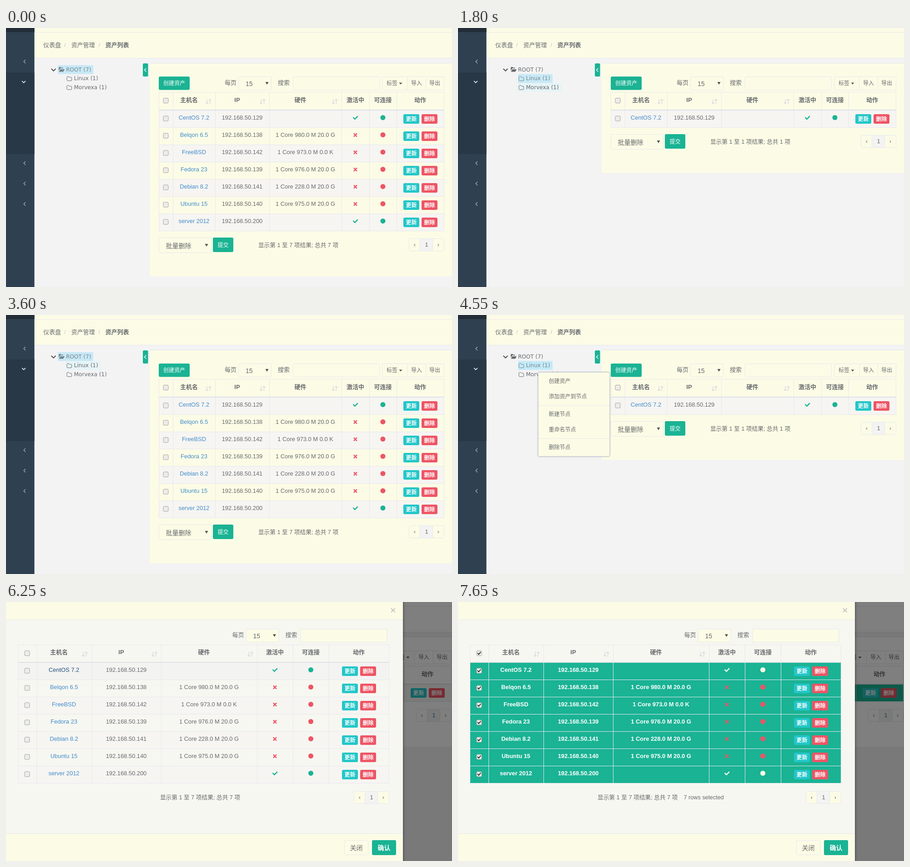
These frames come from a looping animation (981x571 px, 8 s). An HTML page:

```html
<!DOCTYPE html>
<html lang="zh-CN">
<head>
<meta charset="utf-8">
<title>资产列表</title>
<style>
html, body { margin: 0; width: 100%; height: 100%; overflow: hidden; background: #f3f3f4; }
svg { display: block; width: 981px; height: 571px; --cream: #fcfce6; --text: #676a6c; --line: #e6e8ee; --green: #1ab394; }
text { font: 13px "Liberation Sans", Arial, "Noto Sans CJK SC", "Noto Sans CJK", sans-serif; fill: var(--text); white-space: pre; }
.m { text-anchor: middle; }
.b { font-weight: bold; }
.s { font-size: 12px; }
.l { font-size: 14px; }
.lat { font-size: 12.9px; }
.info { font-size: 12.7px; }
.w { fill: #fff; }
.link { fill: #428bca; }
.deep { fill: #23527c; }
.sep { fill: #c4c5c4; }
.tree { font: 12px "DejaVu Sans", Verdana, sans-serif; }
.on text { fill: #fff; font-weight: bold; }
.close { font-size: 21px; font-weight: bold; fill: #c9cac4; }
.ico { fill: none; stroke-linecap: round; stroke-linejoin: round; }
.dim { --cream: #fff; }
.dim .page { fill: #337ab7; }
</style>
</head>
<body>
<svg id="stage" viewBox="0 0 981 571" xmlns="http://www.w3.org/2000/svg"></svg>
<script>
const hosts = [
  ['CentOS 7.2', 129, '', 1],
  ['Belqon 6.5', 138, '1 Core 980.0 M 20.0 G', 0],
  ['FreeBSD', 142, '1 Core 973.0 M 0.0 K', 0],
  ['Fedora 23', 139, '1 Core 976.0 M 20.0 G', 0],
  ['Debian 8.2', 141, '1 Core 228.0 M 20.0 G', 0],
  ['Ubuntu 15', 140, '1 Core 975.0 M 20.0 G', 0],
  ['server 2012', 200, '', 1]
];
const views = [hosts, [hosts[0]], [hosts[6]]];
const nodes = [['ROOT (7)', 114, 78], ['Linux (1)', 132, 76], ['Morvexa (1)', 132, 96]];
const mainCols = [336, 367, 460, 579, 738, 799, 859, 963];
const modalCols = [26, 67, 188, 341, 552, 631, 710, 842];
const green = 'var(--green)', cream = 'var(--cream)', line = 'var(--line)';
const red = '#ed5565', teal = '#23c6c8';

// [time, changes]: sel/hov = tree node, view = table contents, item = menu entry, layer = backdrop/dialog
const LOOP = 8000;
const steps = [
  [0, {sel: 0, hov: -1, view: 0, menu: 0, item: -1, focus: 0, layer: 0, row: -1, link: -1, on: 0, box: -2, press: 0, all: 0}],
  [950, {hov: 0}], [1100, {hov: 1}], [1500, {sel: 1}], [1550, {view: 1}],
  [1800, {hov: 2}], [2300, {sel: 2}], [2350, {view: 2}],
  [2800, {hov: 1}], [2850, {hov: 0}], [3200, {sel: 0}], [3250, {view: 0}],
  [3600, {hov: 1}], [4100, {sel: 1, view: 1}], [4550, {menu: 1}],
  [5000, {hov: -1, item: 0}], [5050, {item: 1}], [5750, {focus: 1}],
  [5900, {menu: 0, layer: 1}], [5950, {layer: 2, row: 1}],
  [6250, {row: 0, link: 0}], [6300, {link: -1}], [6500, {row: -1}],
  [6650, {box: -1}], [6850, {press: 1}], [7000, {on: 1, press: 0}], [7050, {all: 1, box: -2}],
  [7550, {box: 6}], [7650, {box: -2}]
];

const text = (x, y, s, c = '') => `<text x="${x}" y="${y}" class="${c}">${s}</text>`;
const rect = (x, y, w, h, fill, r = 0, extra = '') =>
  `<rect x="${x}" y="${y}" width="${w}" height="${h}" rx="${r}" fill="${fill}" ${extra}/>`;
const frame = (x, y, w, h, r = 1, fill = cream, color = line) =>
  rect(x + .5, y + .5, w - 1, h - 1, fill, r, `stroke="${color}"`);
const hline = (x, y, w, c = line, h = 1) => rect(x, y, w, h, c);
const path = (d, color, w) => `<path class="ico" d="${d}" stroke="${color}" stroke-width="${w}"/>`;
const shape = (d, c) => `<path d="${d}" fill="${c}"/>`;
const left = (x, y, c, w = 1.3) => path(`M${x + 2} ${y - 3.5}l-3.5 3.5 3.5 3.5`, c, w);
const down = (x, y, c, w = 1.6, r = 3.5) => path(`M${x - r} ${y - r / 2}l${r} ${r} ${r} ${-r}`, c, w);
const caret = (x, y, r = 3.5, h = 6) => shape(`M${x - r} ${y - h / 2}h${2 * r}l${-r} ${h}z`, '#555');
const button = (x, y, w, h, s, fill, c = 's', dy = 4.5) =>
  rect(x, y, w, h, fill, 3) + text(x + w / 2, y + h / 2 + dy, s, 'm w ' + c);

function checkbox(x, y, on, hover, press) {
  return rect(x - 5.5, y - 5.5, 11, 11, press ? '#d4d4d4' : '#ececea', 2, `stroke="${hover ? '#666' : '#a3a3a3'}"`) +
    (on ? path(`M${x - 3} ${y}l2.2 2.5 4 -5`, '#333', 2) : '');
}

function sorter(x, y) {
  return path(`M${x - 3} ${y - 5}v10m-2.5 -2.5l2.5 2.5 2.5 -2.5M${x + 3.5} ${y + 5}v-10m-2.5 2.5l2.5 -2.5 2.5 2.5`, '#d9dbe1', 1.5);
}

function table(cols, top, rows, o) {
  const mid = i => (cols[i] + cols[i + 1]) / 2;
  const x0 = cols[0], w = cols[7] - x0;
  let s = '';
  ['主机名', 'IP', '硬件', '激活中', '可连接', '动作'].forEach((h, i) => {
    s += text(mid(i + 1) - (i < 3 ? 11 : 0), top + 22 - o.lift, h, 'm b');
    if (i < 3) s += sorter(cols[i + 2] - 15, top + 21);
  });
  s += checkbox(mid(0), top + 19, o.on, o.box === -1, o.press);
  rows.forEach(([name, ip, hw, up], i) => {
    const y = top + 40 + i * 38 - o.lift, c = y + 16.5;
    const fill = o.on ? green : o.row === i ? '#f3f3f2' : i % 2 ? 'none' : '#f6f5f2';
    const ok = o.on ? '#fcfce6' : green;
    s += `<g class="${o.on ? 'on' : ''}">` + rect(x0, y, w, 38, fill) +
      text(mid(1), y + 21, name, 'm lat ' + (o.link === i ? 'deep' : 'link')) +
      text(mid(2), y + 21, '192.168.50.' + ip, 'm lat') + text(mid(3), y + 21, hw, 'm lat') + '</g>';
    s += checkbox(mid(0), y + 18.5, o.on, o.box === i);
    s += up ? path(`M${mid(4) - 4.3} ${c + .2}l3.2 3.2 5.8 -6`, ok, 2.4)
      : path(`M${mid(4) - 2.8} ${c - 2.3}l5.6 5.6m0 -5.6l-5.6 5.6`, red, 2.5);
    s += `<circle cx="${mid(5)}" cy="${c}" r="5.5" fill="${up ? ok : red}"/>`;
    s += button(mid(6) - 37, y + 9, 35, 21, '更新', teal, 's b') + button(mid(6) + 3, y + 9, 35, 21, '删除', red, 's b');
  });
  const base = top + 40 + rows.length * 38 - o.lift;
  s += hline(x0, top, w) + hline(x0, top + 39 - o.lift, w, '#dfe1e8', 2);
  rows.forEach((_, i) => { s += hline(x0, top + 78 - o.lift + i * 38, w); });
  cols.forEach(x => { s += rect(x, top, 1, base - top, line); });
  return s;
}

function filters(x, y) {
  return text(x, y + 18, '每页') + frame(x + 30, y, 73, 30) + text(x + 46, y + 21, '15', 'l') + caret(x + 93, y + 15) +
    text(x + 117, y + 18, '搜索') + frame(x + 150, y, 191, 30);
}

function pager(x, y) {
  return frame(x, y, 78, 28, 3) + rect(x + 25, y + 1, 28, 26, '#f3f3f2') +
    rect(x + 24, y, 1, 28, line) + rect(x + 52, y, 1, 28, line) +
    text(x + 13, y + 18, '‹', 'm') + text(x + 39, y + 18, '1', 'm page') + text(x + 65, y + 18, '›', 'm');
}

const summary = n => `显示第 1 至 ${n} 项结果; 总共 ${n} 项`;

function sidebar() {
  let s = rect(0, 0, 62.5, 571, '#2f4050') + rect(0, 0, 62.5, 9, '#232d37') + rect(0, 98, 62.5, 180, '#293846');
  for (const y of [74, 298, 343, 388]) s += left(40.5, y, '#a7b1c2');
  return s + down(39, 119, '#fff');
}

function tree(st) {
  let s = down(104.5, 92.5, '#444', 2, 4.3);
  nodes.forEach(([name, x, w], i) => {
    const y = 82 + i * 19.5, sel = st.sel === i, hov = st.hov === i;
    const ink = sel ? '#75868d' : '#676a6c';
    if (sel) s += rect(x, y, w, 19.5, hov ? '#c3eaf8' : '#c8e9f6');
    else if (hov) s += rect(x, y, w, 19.5, '#e6f4f7');
    s += i ? path(`M134 ${y + 7}q0 -1.5 1.5 -1.5h2.5l1.5 1.8h3.5q1.5 0 1.5 1.5v4.7q0 1.3 -1.5 1.3h-7.5q-1.5 0 -1.5 -1.3z`, ink, 1)
      : shape('M116 94v-6.500q0-1.500 1.500-1.500h2.500l1.300 1.500h3.700q1 0 1 1.500h-6.500zM116.500 96.500l3-5.500h9.500l-3 5.500z', ink);
    s += text(i ? 149.5 : 132, y + 13.7, name, 'tree').replace('<text', `<text style="fill:${ink}"`);
  });
  return s;
}

function page(st) {
  const rows = views[st.view], dy = (rows.length - 7) * 38;
  return rect(0, 0, 981, 571, '#f3f3f4') + rect(62, 0, 919, 66, cream) + hline(62, 9, 919) + hline(62, 66, 919) +
    sidebar() +
    text(82, 42, '仪表盘') + text(128, 42, '/', 'sep') + text(143.5, 42, '资产管理') +
    text(203.5, 42, '/', 'sep') + text(218.5, 42, '资产列表', 'b') +
    tree(st) +
    rect(316, 77, 665, 470.5 + dy, cream) + hline(316, 77, 665) +
    rect(301, 78, 11.5, 29, green, 2.5) + left(306, 92.500, '#fff', 1.4) +
    `<g transform="translate(${st.layer ? 16 : 0})">` +
    button(336, 107, 68, 29.5, '创建资产', green) + filters(481, 107) +
    frame(827, 107, 56, 30) + frame(882, 107, 42, 30) + frame(923, 107, 41, 30) +
    text(849, 126, '标签', 'm s') + caret(868, 122.5, 3.5, 4) + text(903, 126, '导入', 'm s') + text(943, 126, '导出', 'm s') +
    table(mainCols, 141, rows, {on: st.all, row: -1, link: -1, box: -2, lift: 0}) +
    frame(336, 462 + dy, 116, 34) + text(351.5, 485 + dy, '批量删除', 'l') + caret(441, 479 + dy) +
    button(455, 462 + dy, 45, 32, '提交', green) +
    text(643, 483 + dy, summary(rows.length), 'm info') + pager(886, 464 + dy) + '</g>';
}

function menu(st) {
  const top = [130, 164, 203, 237, 276];
  let s = rect(176.5, 126.5, 157, 185, cream, 3, 'stroke="#cfd2d6" style="filter:drop-shadow(0 0 1.5px rgba(86,96,117,.6))"');
  s += hline(177, 199, 156) + hline(177, 272, 156);
  ['创建资产', '添加资产到节点', '新建节点', '重命名节点', '删除节点'].forEach((name, i) => {
    const hot = st.item === i;
    if (hot) s += st.focus ? rect(177, 165, 156, 30, cream, 1, 'stroke="#7daeea" stroke-width="2"')
      : rect(177, top[i], 156, 31, '#f5f5f3');
    s += text(199.5, top[i] + 19.5, name, 's').replace('<text', hot ? '<text style="fill:#262626"' : '<text');
  });
  return s;
}

function dialog(st) {
  return rect(-5, -5, 878, 581, '#f7f7f1', 0, 'style="filter:drop-shadow(0 0 3px rgba(0,0,0,.5))"') +
    rect(0, 0, 873, 39, cream) + hline(0, 39, 873) + rect(0, 510, 873, 61, cream) + hline(0, 510, 873) +
    text(851.5, 25, '×', 'close m') + filters(497.5, 59) +
    table(modalCols, 94, hosts, {on: st.on, row: st.row, link: st.link, box: st.box, press: st.press, lift: 1}) +
    (st.on ? text(307, 435, summary(7), 'info') + text(496.5, 435, '7 rows selected', 'info')
      : text(427, 435, summary(7), 'm info')) +
    pager(765, 417) +
    frame(744, 525, 53, 33, 3) + text(770.5, 547, '关闭', 'm l') + button(805, 525, 53, 33, '确认', green, 'l b', 5.5);
}

function render(st) {
  return `<g class="${st.layer ? 'dim' : ''}">${page(st)}</g>` +
    (st.menu ? menu(st) : '') +
    (st.layer ? rect(0, 0, 981, 571, 'rgba(0,0,0,.5)') : '') +
    (st.layer > 1 ? dialog(st) : '');
}

const stage = document.getElementById('stage');
const start = performance.now();
let shown = 0;

function tick() {
  const t = (performance.now() - start) % LOOP;
  const past = steps.filter(([at]) => at <= t);
  if (past.length !== shown) {
    shown = past.length;
    stage.innerHTML = render(Object.assign({}, ...past.map(p => p[1])));
  }
  requestAnimationFrame(tick);
}
tick();
</script>
</body>
</html>
```
